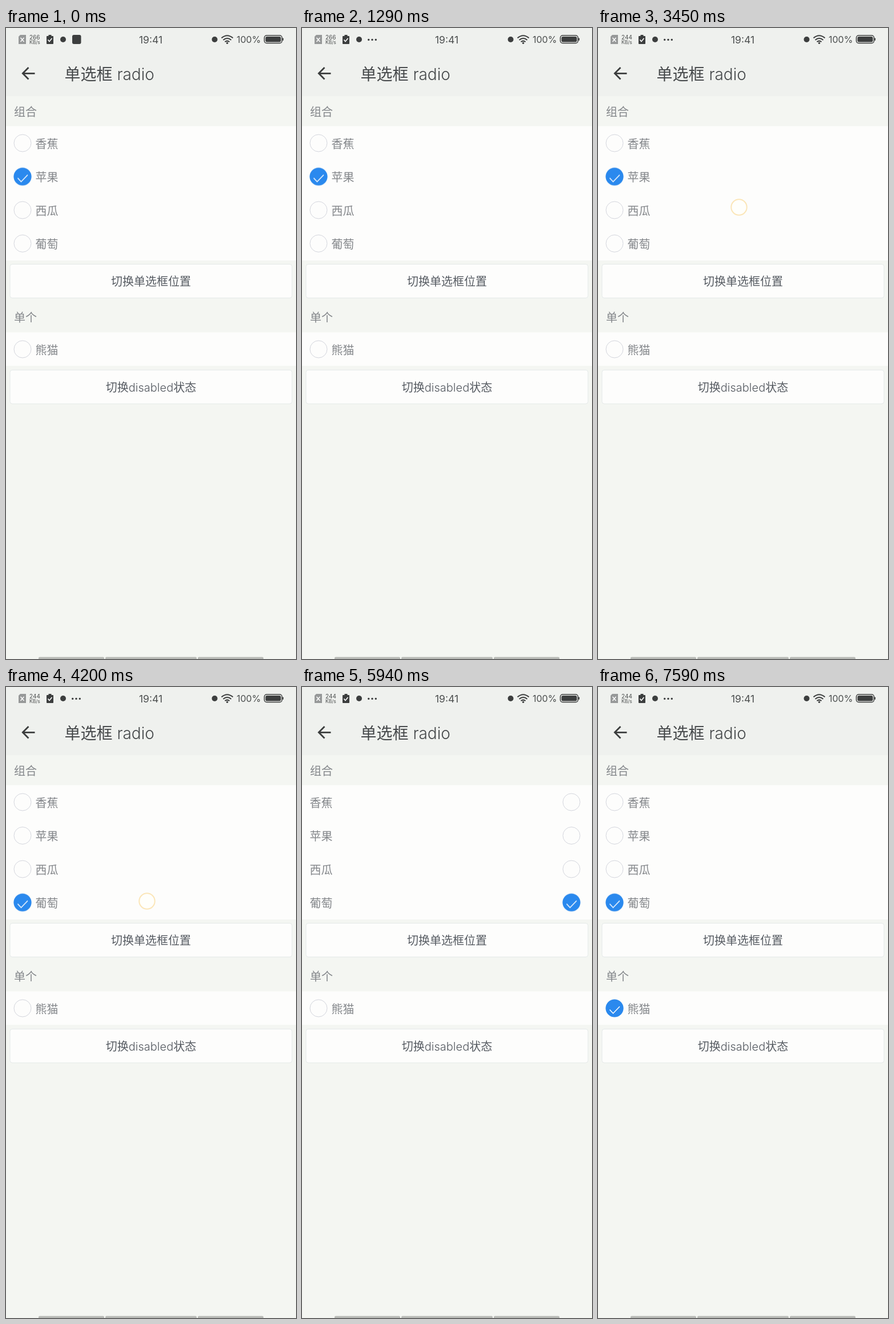
These frames come from a looping animation (508 px wide and 1102 px high, 8000 ms). An HTML page:

```html
<!DOCTYPE html>
<html lang="zh-CN">
<head>
<meta charset="utf-8">
<title>单选框 radio</title>
<style>
html, body { margin: 0; width: 100%; height: 100%; overflow: hidden; background: #f4f6f2; }
svg { display: block; width: 508px; height: 1102px; font: 350 20px Inter, "Noto Sans CJK SC", "Noto Sans CJK", sans-serif; }
text { fill: #555a61; }
.soft { fill: #83868a; }
.title { font-size: 28px; fill: #45484a; }
.mid { text-anchor: middle; }
.panel { fill: #fdfdfc; }
.btn { fill: #fdfdfc; stroke: #e4e9e8; }
.ring { fill: #fdfdfc; stroke: #d3d5dc; }
.dot { fill: #2a89ee; }
.tick { fill: none; stroke: #fff; stroke-width: 1.5; }
.dark { fill: #3c3e3e; }
.line { fill: none; stroke: #3c3e3e; }
.status text { font-weight: 400; fill: #4c4f4f; }

/* one 8 s clock drives every part */
.on, .side, .icon, .more, .speed { animation: 8s step-end infinite; }
.on { opacity: 0; }
.banana { animation-name: banana; }
.apple { animation-name: apple; }
.melon { animation-name: melon; }
.grape { animation-name: grape; }
.panda { animation-name: panda; }
@keyframes banana { 0%, 36.25% { opacity: 0 } 21.5% { opacity: 1 } }
@keyframes apple { 0%, 36.25% { opacity: 1 } 21.5%, 44.375% { opacity: 0 } }
@keyframes melon { 0%, 51.25% { opacity: 0 } 44.375% { opacity: 1 } }
@keyframes grape { 0% { opacity: 0 } 51.25%, 100% { opacity: 1 } }
@keyframes panda { 0% { opacity: 0 } 93.125%, 100% { opacity: 1 } }

.side { animation-name: slot; }
.side.name { animation-name: label; }
@keyframes slot { 0%, 79.75% { transform: none } 64.375% { transform: translateX(443px) } }
@keyframes label { 0%, 79.75% { transform: none } 64.375% { transform: translateX(-38px) } }

.icon { animation-name: leave; animation-timing-function: linear; }
.more { animation-name: enter; animation-timing-function: linear; }
@keyframes leave { 0%, .625% { opacity: 1 } 3%, 100% { opacity: 0 } }
@keyframes enter { 0%, 2% { opacity: 0 } 4%, 100% { opacity: 1 } }
.speed.before { animation-name: before; }
.speed.after { animation-name: after; }
@keyframes before { 0% { opacity: 1 } 22.5%, 100% { opacity: 0 } }
@keyframes after { 0% { opacity: 0 } 22.5%, 100% { opacity: 1 } }

.tap { fill: #fffffb; fill-opacity: .7; stroke: #fbe6b8; stroke-width: 2; opacity: 0; animation: tap 8s linear var(--at) infinite; }
@keyframes tap { 0%, 3%, 100% { opacity: 0 } .5%, 2.75% { opacity: 1 } }
</style>
</head>
<body>
<svg viewBox="0 0 508 1102">
  <defs>
    <g id="checked">
      <circle class="dot" r="15.6"/>
      <path class="tick" d="M-8.500 2.500L-2.500 9L9-3"/>
    </g>
  </defs>

  <rect width="508" height="1102" fill="#f4f6f2"/>
  <rect width="508" height="119" fill="#eff1ee"/>

  <g class="status">
    <path d="M25 12H35V28H22V15Z" fill="#979999"/>
    <path d="M25.500 17L31.500 24M31.500 17L25.500 24" stroke="#fff" stroke-width="1.500"/>
    <g font-size="10">
      <text class="speed before" x="41" y="19.500">266</text>
      <text class="speed after" x="41" y="19.500">244</text>
    </g>
    <text x="41" y="28.300" font-size="8.500">KB/s</text>
    <path class="dark" d="M72 14H74.500V12H79.500V14H82Q83 14 83 15V27Q83 28 82 28H72Q71 28 71 27V15Q71 14 72 14Z"/>
    <path d="M73.500 20.500L76 23.500L80.500 18" fill="none" stroke="#fff" stroke-width="1.600"/>
    <circle class="dark" cx="100" cy="20" r="5"/>
    <rect class="icon dark" x="116" y="12" width="15.500" height="16" rx="3"/>
    <g class="more dark">
      <circle cx="116.700" cy="20.500" r="1.700"/>
      <circle cx="123" cy="20.500" r="1.700"/>
      <circle cx="129.300" cy="20.500" r="1.700"/>
    </g>
    <text class="mid" x="253.500" y="26.700" font-size="17.500">19:41</text>
    <circle class="dark" cx="365.500" cy="20" r="5"/>
    <path class="line" stroke-width="2" d="M377.500 17.500Q387.500 9 397.500 17.500M380.500 21Q387.500 15 394.500 21M383.500 24.300Q387.500 21 391.500 24.300"/>
    <circle class="dark" cx="387.500" cy="26.300" r="1.700"/>
    <text x="404" y="26" font-size="16">100%</text>
    <rect class="line" x="452.500" y="13" width="31" height="13.500" rx="4" stroke-width="1.500"/>
    <rect class="dark" x="454.500" y="15" width="27" height="9.500" rx="2.500"/>
    <rect class="dark" x="484.300" y="17.500" width="1.800" height="4.500" rx=".8"/>
  </g>

  <path class="line" stroke-width="2.800" d="M50.500 79.300H29.500M39.500 69L29.300 79.300L39.500 89.600"/>
  <text class="title" x="102.500" y="91">单选框 radio</text>

  <text class="soft" x="14" y="153.500">组合</text>
  <rect class="panel" y="171.500" width="508" height="234.500"/>
  <g class="side">
    <g class="ring">
      <circle cx="29" cy="201" r="15"/>
      <circle cx="29" cy="259.500" r="15"/>
      <circle cx="29" cy="318" r="15"/>
      <circle cx="29" cy="376.300" r="15"/>
    </g>
    <use class="on banana" href="#checked" x="29" y="201"/>
    <use class="on apple" href="#checked" x="29" y="259.500"/>
    <use class="on melon" href="#checked" x="29" y="318"/>
    <use class="on grape" href="#checked" x="29" y="376.300"/>
  </g>
  <g class="side name">
    <text class="soft" x="51.500" y="209.500">香蕉</text>
    <text class="soft" x="51.500" y="268">苹果</text>
    <text class="soft" x="51.500" y="326.500">西瓜</text>
    <text class="soft" x="51.500" y="384.800">葡萄</text>
  </g>

  <rect class="btn" x="7" y="412.500" width="494" height="59" rx="4"/>
  <text class="mid" x="254" y="450.300">切换单选框位置</text>

  <text class="soft" x="14" y="513.300">单个</text>
  <rect class="panel" y="531.500" width="508" height="58.500"/>
  <circle class="ring" cx="29" cy="561" r="15"/>
  <use class="on panda" href="#checked" x="29" y="561"/>
  <text class="soft" x="51.500" y="569.500">熊猫</text>

  <rect class="btn" x="7" y="597.300" width="494" height="59" rx="4"/>
  <text class="mid" x="254" y="635.200">切换disabled状态</text>

  <g fill="#b8bab6">
    <rect x="57" y="1098.500" width="115" height="6" rx="2"/>
    <rect x="174" y="1098.500" width="160" height="6" rx="2"/>
    <rect x="336" y="1098.500" width="115" height="6" rx="2"/>
  </g>

  <circle class="tap" style="--at:1.58s" cx="247" cy="203" r="13.700"/>
  <circle class="tap" style="--at:2.77s" cx="247" cy="259" r="13.700"/>
  <circle class="tap" style="--at:3.27s" cx="247" cy="313" r="13.700"/>
  <circle class="tap" style="--at:4.01s" cx="247" cy="374" r="13.700"/>
  <circle class="tap" style="--at:4.85s" cx="300" cy="450" r="13.700"/>
  <circle class="tap" style="--at:6.09s" cx="300" cy="450" r="13.700"/>
  <circle class="tap" style="--at:7.35s" cx="247" cy="561" r="13.700"/>
</svg>
</body>
</html>
```
